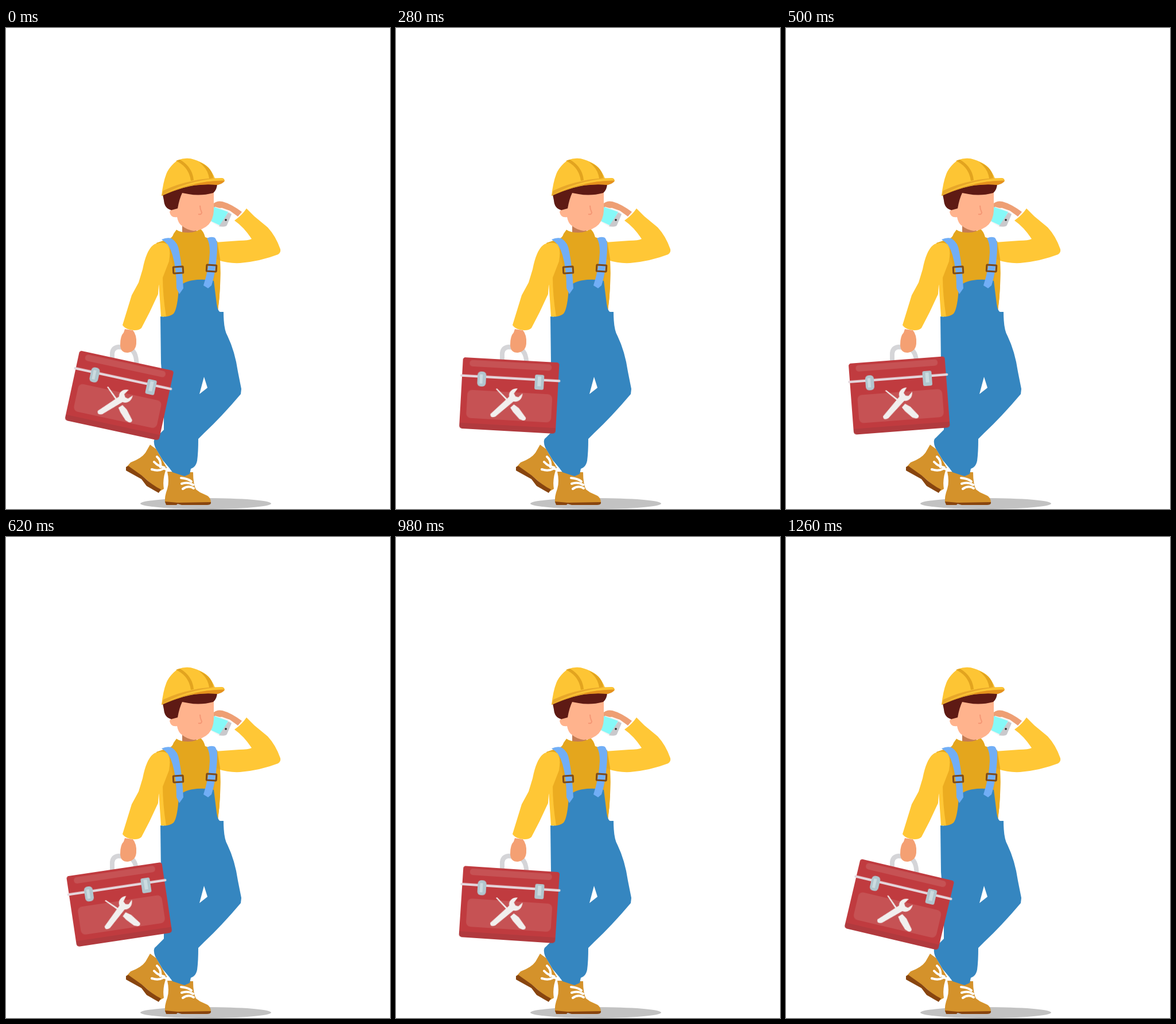
These frames come from a looping animation (669x837 px, 1.28 s). An HTML page without scripts:

```html
<!DOCTYPE html>
<html lang="en">
<head>
<meta charset="utf-8">
<title>Worker with toolbox</title>
<style>
  html, body { margin: 0; width: 100%; height: 100%; overflow: hidden; background: #fff; }
  svg { display: block; width: 100%; height: 100%; }
  .sleeve { fill: #ffc736; }
  .denim { fill: #3586c0; }
  .strap { fill: #71aef6; }
  .buckle { fill: none; stroke: #7c4a1c; stroke-width: 3; }
  .boot { fill: #d4922b; }
  .sole { fill: #88450f; }
  .lace { fill: none; stroke: #fff; stroke-width: 4; stroke-linecap: round; }
  .panel { fill: #c65254; }
  .latch { fill: #b1c6ce; }
  .tool { fill: #f1efee; }
  .box { animation: swing 1280ms -2ms infinite; }
  /* the box turns at a steady rate, one small step every 20 ms */
  @keyframes swing {
    0% { transform: rotate(12.2deg); animation-timing-function: linear; }
    1.5625% { transform: rotate(12.2deg); animation-timing-function: steps(30); }
    48.4375% { transform: rotate(-8.5deg); animation-timing-function: steps(32); }
    98.4375%, 100% { transform: rotate(13.3deg); }
  }
</style>
</head>
<body>
<svg viewBox="0 0 669 837" preserveAspectRatio="none">
  <ellipse cx="348" cy="827.5" rx="114" ry="9.5" fill="#c2c2c2"/>

  <g id="back-boot">
    <path class="boot" d="M251 725L243 739Q236 749 217 756L210 764L238 780L268 806L275 802Q272 784 280 765L262 733Z"/>
    <path class="sole" d="M209 764L213 762L237 779Q255 796 270 803L266 809L245 797L236 785L209 770Z"/>
    <path class="lace" d="M263 746Q271 753 269 764M258 755Q264 762 276 765M254 768Q265 772 274 767M276 767L286 771"/>
  </g>
  <g id="front-boot">
    <path class="boot" d="M281 772L326 773Q326 794 331 803L338 808L351 814Q357 818 357 826H277Q276 815 281 802Q285 789 281 772Z"/>
    <path class="sole" d="M277 824L299 826L357 825V827Q356 830 350 830H306L299 828L297 830H279Z"/>
    <path class="lace" d="M305 783Q317 784 323 789M306 793Q317 789 326 795M308 802Q318 795 327 801"/>
  </g>

  <g id="phone-hand">
    <path fill="#ee9f74" d="M361 306Q367 300 377 302Q392 306 411 320L404 328L390 318L376 313L362 315Z"/>
    <path fill="#f3f3f3" d="M364 311L385 317L393 322L384 344L372 346L357 337Z"/>
    <path fill="#86f9f8" d="M361 311L387 320L374 344L357 336Z"/>
    <path fill="#c9c9cc" d="M387 321L393 324L385 343Q383 347 371 345Z"/>
    <circle cx="383" cy="334" r="1.8" fill="#222"/>
  </g>

  <path class="sleeve" d="M364 373L406 370Q423 370 428 367Q414 346 398 335Q411 326 419 314L433 328L456 347Q470 362 478 385Q479 391 474 394Q443 406 408 409Q387 410 370 404Z"/>

  <g id="torso">
    <path fill="#c57c54" d="M307 344H332V358H307Z"/>
    <path fill="#e4a61d" d="M297 351Q303 356 318 356Q332 356 338 349Q344 353 347 364L368 371L373 402Q375 450 369 492L362 497L275 503L268 440L262 374L286 366Q290 364 292 358Z"/>
    <path fill="#ecac20" d="M272 432L287 398L297 440L301 465L295 495Q289 503 270 502Z"/>
    <path fill="#ffc736" d="M266 442L273 432Q273 465 279 502L270 502Z"/>
    <path fill="#ecac20" d="M365 402L373 404Q375 450 369 492L362 455Z"/>
  </g>

  <path class="denim" fill-rule="evenodd" d="M301 451Q310 440 333 438Q350 437 362 440L367 480Q369 493 373 494L379 494Q379 525 386 536Q399 563 404 598L410 628L409 637Q376 676 345 705L335 715Q335 738 333 753Q331 764 322 767L320 776L311 780L290 773L284 765L273 752L260 730Q255 717 261 713L275 699L275 645L270 583L269 502Q284 504 292 497Q299 488 301 451ZM345 607L337 637L351 626Z"/>
  <path class="strap" d="M271 368Q280 364 288 366Q300 373 302 390Q307 415 309 453L302 463L297 453Q297 418 290 395Q285 376 271 368Z"/>
  <path class="strap" d="M350 366Q357 362 364 365Q369 371 368 383Q366 424 358 448L352 453L344 448Q354 417 355 390Q355 373 350 366Z"/>
  <rect class="buckle" x="291.5" y="415.5" width="17" height="11" rx="1" transform="rotate(-3 300 421)"/>
  <rect class="buckle" x="349.5" y="412.5" width="17" height="11" rx="1" transform="rotate(3 358 418)"/>

  <path class="sleeve" d="M259 376Q272 371 281 376Q288 385 284 406L272 437L266 448L265 463L250 495L236 522Q230 528 216 525Q207 523 203 517L211 491L219 465L231 443L238 420Q245 384 259 376Z"/>

  <g id="head">
    <path fill="#ffb38d" d="M302 284H362V318Q361 333 353 342Q343 352 327 353Q314 351 305 343Q300 339 298 329Q287 331 285 320L289 314H298Z"/>
    <path fill="none" stroke="#f59775" stroke-width="2" d="M338 309Q338 315 341 321Q341 325 335 324"/>
    <path fill="#5e1a14" d="M273 290L300 272L368 270Q368 281 361 287Q339 293 318 289L307 287Q302 297 299 314L288 317Q276 314 275 300Z"/>
    <path fill="#fdc534" d="M271 292Q274 265 281 250Q287 239 299 230Q315 224 328 229Q349 236 356 247Q362 256 364 262L376 261Q381 262 381 266L369 273Q346 270 320 275Q295 281 271 292Z"/>
    <path fill="#e2a41f" d="M296 231L303 229Q325 242 327 265L322 266Q319 242 296 231ZM336 233Q352 245 354 262L361 261Q360 243 336 233Z"/>
    <path fill="#e7a72a" d="M271 292L274 283Q299 271 326 266Q350 260 379 262L380 267L352 270Q311 274 271 292Z"/>
    <path fill="#fdc534" d="M273 290Q300 275 329 268Q354 262 377 261L380 265Q349 266 320 273Q296 279 273 290Z"/>
    <path fill="#e5921d" d="M328 272Q352 265 381 266Q378 271 369 273Q350 271 328 274Z"/>
  </g>

  <path fill="none" stroke="#d5d5d8" stroke-width="8" d="M185 580V566Q186 556 196 555L212 557Q228 560 227.5 588"/>
  <path fill="#f4a073" d="M207 524L221 526Q228 534 227 549Q226 563 212 565Q199 565 199 551Q199 536 205 530Z"/>

  <g transform="translate(197.3 639.5)">
    <g class="box">
      <rect x="-84" y="-62" width="168" height="124" rx="5" fill="#b13a3e"/>
      <path fill="#c03b3f" d="M-84 52V-57Q-84 -62 -79 -62H79Q84 -62 84 -57V52Z"/>
      <rect class="panel" x="-72" y="-58" width="143" height="11" rx="5"/>
      <rect class="panel" x="-73" y="-6" width="148" height="49" rx="8"/>
      <rect x="-87" y="-32.3" width="174.5" height="4.2" rx="2" fill="#e5d6dc"/>
      <rect class="latch" x="-57" y="-39" width="15" height="26" rx="6"/>
      <rect class="latch" x="43" y="-39" width="16" height="26" rx="3"/>
      <path fill="#cbdbe0" d="M-53 -34H-48V-18H-53ZM48 -36H54V-19H48Z"/>
      <path class="tool" d="M0 2C-2 -7 5 -13 14 -13L8 -4L11 1L16 2L23 -5C23 6 16 11 8 10L-22 38Q-31 42 -31 34Z"/>
      <path class="tool" d="M-24 -10L-22 -11L-3 6L-5 8ZM3 21L9 15L18 21L31 37Q32 42 26 42L20 40L8 28Z"/>
    </g>
  </g>
</svg>
</body>
</html>
```
